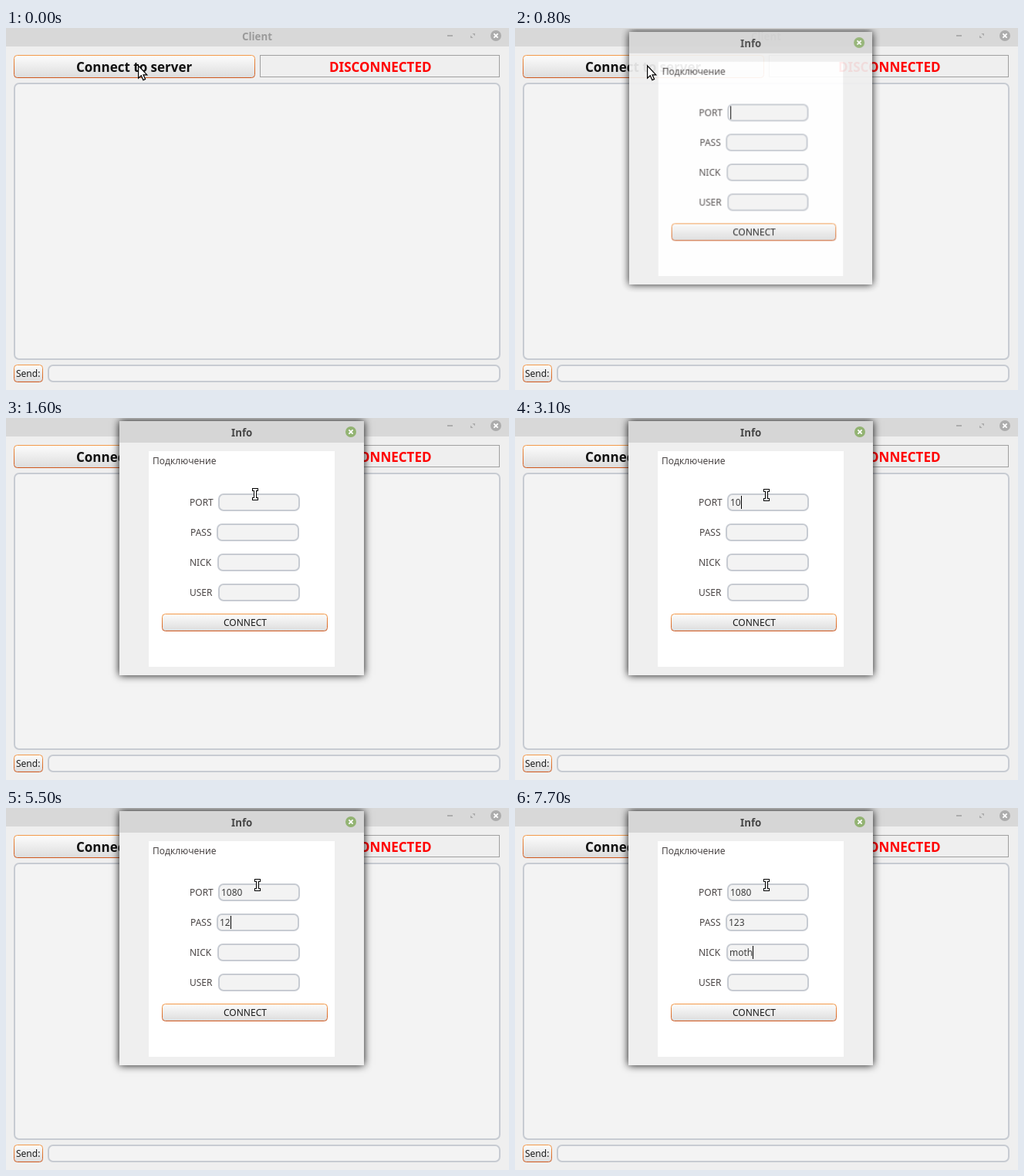
Animation, 652 px wide and 470 px high, one loop 8000 ms. Source, as an HTML page with a canvas:

```html
<!DOCTYPE html>
<html lang="en">
<head>
<meta charset="utf-8">
<title>Client</title>
<style>
html, body { margin: 0; width: 100%; height: 100%; overflow: hidden; background: #efefef; }
canvas { display: block; }
</style>
</head>
<body>
<canvas id="stage" width="652" height="470"></canvas>
<script>
const W = 652, H = 470, LOOP = 8000, STEP = 100;
const PRESS = 500, OPEN = 800, BLINK = 530;
const ctx = document.getElementById('stage').getContext('2d');
const layer = document.createElement('canvas');
layer.width = W;
layer.height = H;
const dlg = layer.getContext('2d');

// Each field gets the focus at one time and a character at each key time
const fields = [
  { label: 'PORT', x: 275, text: '1080', focus: 680, keys: [2900, 3100, 4000, 4300] },
  { label: 'PASS', x: 273, text: '123', focus: 4600, keys: [5300, 5500, 5700] },
  { label: 'NICK', x: 274, text: 'moth', focus: 6000, keys: [6900, 7000, 7200, 7700] },
  { label: 'USER', x: 275, text: '', focus: Infinity, keys: [] }
];

function text(c, str, x, y, color, size = 12, bold = false) {
  c.font = `${bold ? 'bold ' : ''}${size}px "Noto Sans", sans-serif`;
  c.fillStyle = color;
  c.fillText(str, x, y);
  return c.measureText(str).width;
}

function centered(c, str, x, y, color, size, bold) {
  c.font = `${bold ? 'bold ' : ''}${size}px "Noto Sans", sans-serif`;
  text(c, str, Math.round(x - c.measureText(str).width / 2), y, color, size, bold);
}

function rect(c, x, y, w, h, color) {
  c.fillStyle = color;
  c.fillRect(x, y, w, h);
}

function roundBox(c, x, y, w, h, r, fill, stroke, line) {
  c.beginPath();
  c.roundRect(x + line / 2, y + line / 2, w - line, h - line, r);
  c.fillStyle = fill;
  c.fill();
  c.strokeStyle = stroke;
  c.lineWidth = line;
  c.stroke();
}

function shade(c, y, h, top, bottom) {
  const g = c.createLinearGradient(0, y, 0, y + h);
  g.addColorStop(0, top);
  g.addColorStop(1, bottom);
  return g;
}

function button(c, x, y, w, h, pressed) {
  const fill = pressed ? shade(c, y, h, '#d4d4d4', '#e2e2e2') : shade(c, y, h, '#fdfdfd', '#dcdcdc');
  roundBox(c, x, y, w, h, 4, fill, shade(c, y, h, '#f39a4a', '#cf561c'), 1);
}

const inputBox = (c, x, y, w, h) => roundBox(c, x, y, w, h, 6, '#f3f3f3', '#c7cbd2', 2);

function closeIcon(c, x, y, color) {
  c.beginPath();
  c.arc(x, y, 7, 0, Math.PI * 2);
  c.fillStyle = color;
  c.fill();
  c.beginPath();
  for (const s of [-1, 1]) {
    c.moveTo(x - 2.6, y - 2.6 * s);
    c.lineTo(x + 2.6, y + 2.6 * s);
  }
  c.strokeStyle = '#fff';
  c.lineWidth = 1.8;
  c.stroke();
}

function drawMain(active) {
  rect(ctx, 0, 0, W, H, '#efefef');
  rect(ctx, 0, 0, W, 24, '#d8d8d8');
  const ink = active ? '#444' : '#acacac';
  centered(ctx, 'Client', 325.5, 16, active ? '#444' : '#9a9a9a', 13.33, true);
  rect(ctx, 572, 9, 7, 2, ink);
  ctx.fillStyle = ink;
  for (const s of [-1, 1]) {
    ctx.beginPath();
    ctx.moveTo(605 + s * 3, 10 - s * 3);
    ctx.lineTo(605 + s * 3, 10 + s * 0.6);
    ctx.lineTo(605 - s * 0.6, 10 - s * 3);
    ctx.fill();
  }
  closeIcon(ctx, 635, 10, active ? '#92b372' : '#acacac');

  button(ctx, 10, 35, 313, 30, active);
  centered(ctx, 'Connect to server', 166.5, 57, '#111', 17, true);
  ctx.strokeStyle = '#a0a0a0';
  ctx.lineWidth = 1;
  ctx.strokeRect(329.5, 35.5, 310, 28);
  centered(ctx, 'DISCONNECTED', 485, 57, '#f00', 17, true);

  inputBox(ctx, 10, 71, 631, 360);
  button(ctx, 10, 437, 38, 23);
  text(ctx, 'Send:', 13, 453, '#1a1a1a');
  inputBox(ctx, 54, 437, 587, 23);
}

function drawField(c, field, row, t) {
  const y = 98 + 39 * row;
  // Label and box share a row centred in the dialog
  const left = Math.floor(238 + (275 - field.x) / 2);
  text(c, field.label, left, y + 16, '#4a4545');
  inputBox(c, field.x, y, 619 - left - field.x, 23);

  const pressed = field.keys.filter(k => k <= t);
  const value = field.text.slice(0, pressed.length);
  const width = text(c, value, field.x + 4, y + 16, '#3c3c3c');
  const next = fields[row + 1];
  const focused = t >= field.focus && !(next && t >= next.focus);
  const idle = t - Math.max(field.focus, ...pressed);
  if (focused && Math.floor(idle / BLINK) % 2 === 0) {
    rect(c, Math.round(field.x + 4 + width), y + 3, 1, 17, '#000');
  }
}

function drawDialog(t) {
  const c = dlg;
  c.clearRect(0, 0, W, H);
  c.save();
  c.shadowColor = 'rgba(0,0,0,0.95)';
  c.shadowBlur = 10;
  rect(c, 147, 4, 317, 330, '#efefef');
  c.restore();
  rect(c, 147, 4, 317, 28, '#d6d6d6');
  centered(c, 'Info', 305.5, 24, '#474747', 13.33, true);
  closeIcon(c, 447, 18, '#92b372');
  rect(c, 185, 43, 241, 280, '#fff');
  text(c, 'Подключение', 190, 60, '#4a4545');
  fields.forEach((field, row) => drawField(c, field, row, t));
  button(c, 202, 254, 215, 23);
  centered(c, 'CONNECT', 309.5, 270, '#1a1a1a', 12);

  // The dialog opens slightly smaller and translucent
  const opening = t < OPEN + STEP, scale = opening ? 315 / 317 : 1;
  ctx.save();
  ctx.globalAlpha = opening ? 0.92 : 1;
  ctx.translate(305.5, 169);
  ctx.scale(scale, scale);
  ctx.drawImage(layer, -305.5, -169);
  ctx.restore();
}

function drawArrow() {
  const tip = new Path2D('M.6 1V17.2L4.3 13.8L6.9 19.6L9.6 18.4L7 12.8H11.8Z');
  ctx.fillStyle = '#fff';
  ctx.fill(tip);
  ctx.strokeStyle = '#000';
  ctx.lineWidth = 1.2;
  ctx.stroke(tip);
}

function drawBeam() {
  ['#000', '#fff'].forEach((color, inset) => {
    const bar = (w, top, h) => rect(ctx, inset - w / 2, top + inset, w - 2 * inset, h - 2 * inset, color);
    bar(8, -8, 4);
    bar(8, 4, 4);
    bar(4, -8, 16);
  });
}

function drawPointer(t) {
  const p = Math.min(1, Math.max(0, (t - 1200) / 600));
  const ease = 1 - (1 - p) ** 3.5;
  const x = Math.round(171 + 155 * ease), y = Math.round(48 + 52 * ease);
  ctx.save();
  ctx.translate(x, y);
  if (y >= 98) drawBeam();
  else drawArrow();
  ctx.restore();
}

const start = performance.now();
function frame() {
  const elapsed = (performance.now() - start) % LOOP;
  const t = Math.floor(elapsed / STEP) * STEP;
  drawMain(t >= PRESS && t < OPEN);
  if (t >= OPEN) drawDialog(t);
  drawPointer(t);
  requestAnimationFrame(frame);
}
frame();
</script>
</body>
</html>
```
